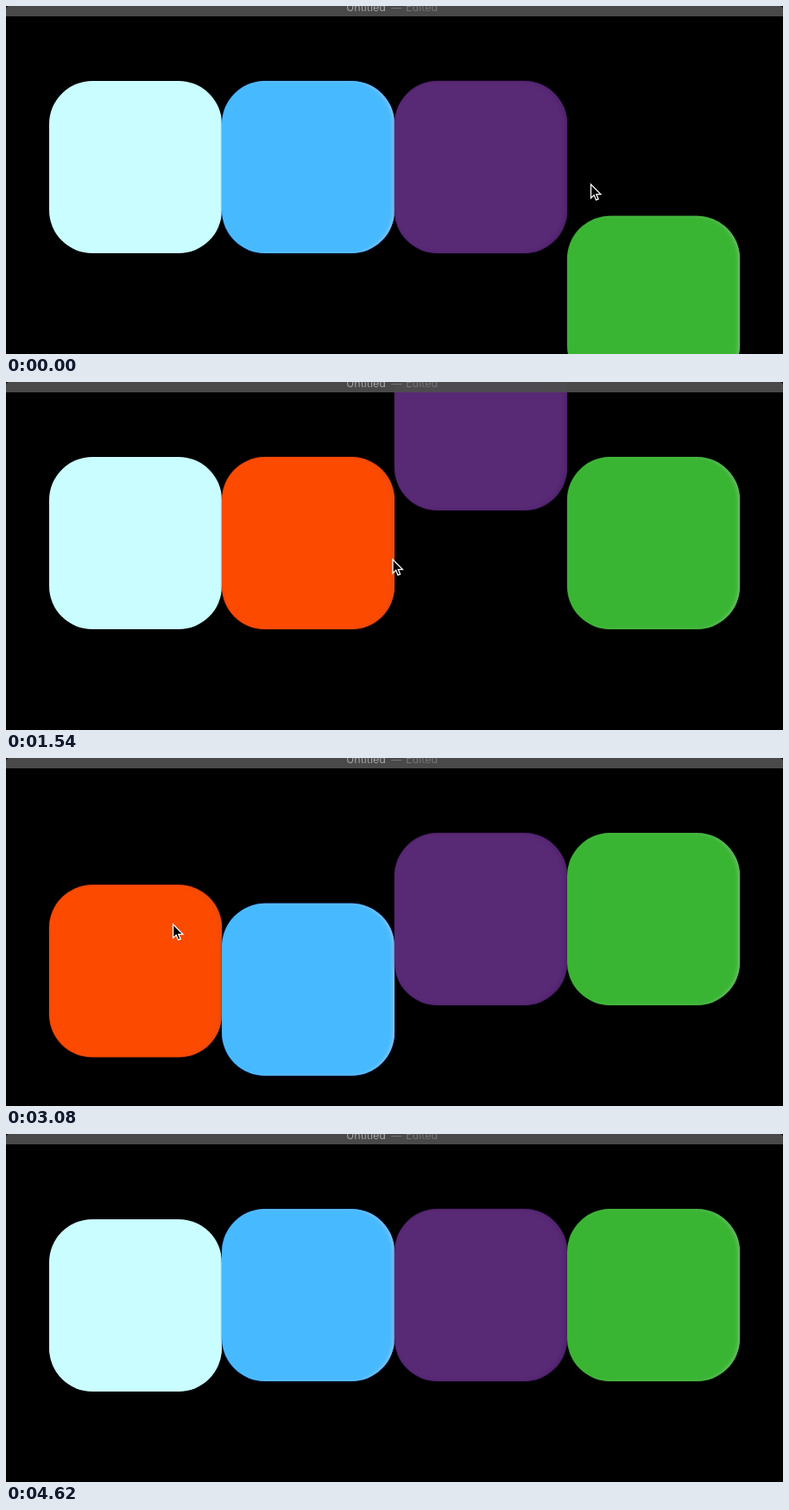
Recreate the animation shown at these times as an HTML page. Size 900 by 404 pixels, loop 4690 ms.

```html
<!DOCTYPE html>
<html lang="en">
<head>
<meta charset="utf-8">
<title>Hover squares</title>
<style>
  html, body { margin: 0; width: 100%; height: 100%; overflow: hidden; background: #000; }
  #stage { position: relative; width: 900px; height: 404px; overflow: hidden; background: #000; }
  .square {
    position: absolute; top: 87px; width: 200px; height: 200px; border-radius: 50px;
    background: var(--color);
  }
  .fringe { box-shadow: inset -3px 0 4px -1px var(--edge), 0 0 2px var(--glow); }
  #bar {
    position: absolute; left: 0; top: 0; width: 900px; height: 11.5px; overflow: hidden;
    background: rgba(78, 78, 78, .94);
    -webkit-backdrop-filter: blur(14px); backdrop-filter: blur(14px);
    border-radius: 4px 4px 0 0;
    font: 12.5px/16px Inter, Roboto, sans-serif; color: #747474; white-space: pre;
  }
  #bar span { position: absolute; top: -6px; }
  #bar .name { color: #a2a2a2; }
  #cursor { position: absolute; left: 0; top: 0; overflow: visible; }
</style>
</head>
<body>
<div id="stage">
  <div id="bar">
    <span class="name" style="left:394px">Untitled</span>
    <span style="left:446px">—</span>
    <span style="left:463px">Edited</span>
  </div>
  <svg id="cursor" width="14" height="20">
    <path d="M0 0V16L3.7 12.6L6 18.2L8.6 17.1L6.3 11.6H11.4Z" fill="#000" stroke="#fff" stroke-width="1.3"/>
  </svg>
</div>
<script>
const LOOP = 4690, STEP = 70, HOT = '#fc4a00';

// on / off: when the pointer enters and leaves; dist and dur: the full hover transition
const squares = [
  { color: '#c9fdff', on: 2765, off: 3610, dist: 300, dur: 2000 },
  { color: '#47baff', edge: '#8fc4ea', glow: '#0a2a9a', on: 1538, off: 2495, dist: 300, dur: 2150 },
  { color: '#582974', edge: '#4c2168', glow: '#3a1458', on: 185, off: 1228, dist: -300, dur: 3000 },
  { color: '#3ab533', edge: '#74bd70', glow: '#15501a', on: -5000, off: -260, dist: 275, dur: 1000 }
];

// time, x, y of the pointer tip
const pointer = [
  [0, 677.5, 207], [185, 648, 207], [420, 581, 206.5], [1190, 582, 206.5],
  [1540, 448, 206], [1820, 378, 206], [2480, 378, 206], [2660, 294.5, 197],
  [2765, 249, 196], [2950, 193.5, 193], [3600, 193.5, 193],
  [3990, 150, 150], [4300, -16, -24]
];

const stage = document.getElementById('stage');
const bar = document.getElementById('bar');
const cursor = document.getElementById('cursor');

squares.forEach((s, i) => {
  s.el = document.createElement('div');
  s.el.className = 'square';
  s.el.style.left = 50 + 200 * i + 'px';
  stage.insertBefore(s.el, bar);
});

const clamp = v => Math.min(1, Math.max(0, v));
const bezier = (u, a, b) => 3 * u * (1 - u) * (1 - u) * a + 3 * u * u * (1 - u) * b + u * u * u;

// the CSS "ease" curve, solved by bisection
function ease(x) {
  if (x <= 0 || x >= 1) return clamp(x);
  let lo = 0, hi = 1;
  for (let i = 0; i < 24; i++) {
    const mid = (lo + hi) / 2;
    if (bezier(mid, .25, .25) < x) lo = mid; else hi = mid;
  }
  return bezier(lo, .1, 1);
}

// an interrupted transition reverses in proportionally less time
function offset(s, t) {
  const reach = ease((Math.min(t, s.off) - s.on) / s.dur);
  const back = t > s.off ? ease((t - s.off) / (s.dur * reach)) : 0;
  return s.dist * reach * (1 - back);
}

function pointerAt(t) {
  const last = pointer.length - 1;
  let i = 0;
  while (i < last - 1 && pointer[i + 1][0] <= t) i++;
  const [t0, x0, y0] = pointer[i], [t1, x1, y1] = pointer[i + 1];
  const k = clamp((t - t0) / (t1 - t0));
  return [x0 + (x1 - x0) * k, y0 + (y1 - y0) * k];
}

function draw(t) {
  for (const s of squares) {
    const hot = t >= s.on && t < s.off;
    const { el } = s;
    el.style.transform = `translateY(${offset(s, t).toFixed(2)}px)`;
    el.style.setProperty('--color', hot ? HOT : s.color);
    el.style.setProperty('--edge', hot ? '#d8501c' : s.edge);
    el.style.setProperty('--glow', hot ? '#8a1c10' : s.glow);
    el.classList.toggle('fringe', hot || !!s.edge);
  }
  const [x, y] = pointerAt(t);
  cursor.style.transform = `translate(${x}px, ${y}px)`;
}

const start = performance.now();
function tick() {
  const t = (performance.now() - start) % LOOP;
  draw(Math.floor(t / STEP) * STEP);
  requestAnimationFrame(tick);
}
tick();
</script>
</body>
</html>
```
